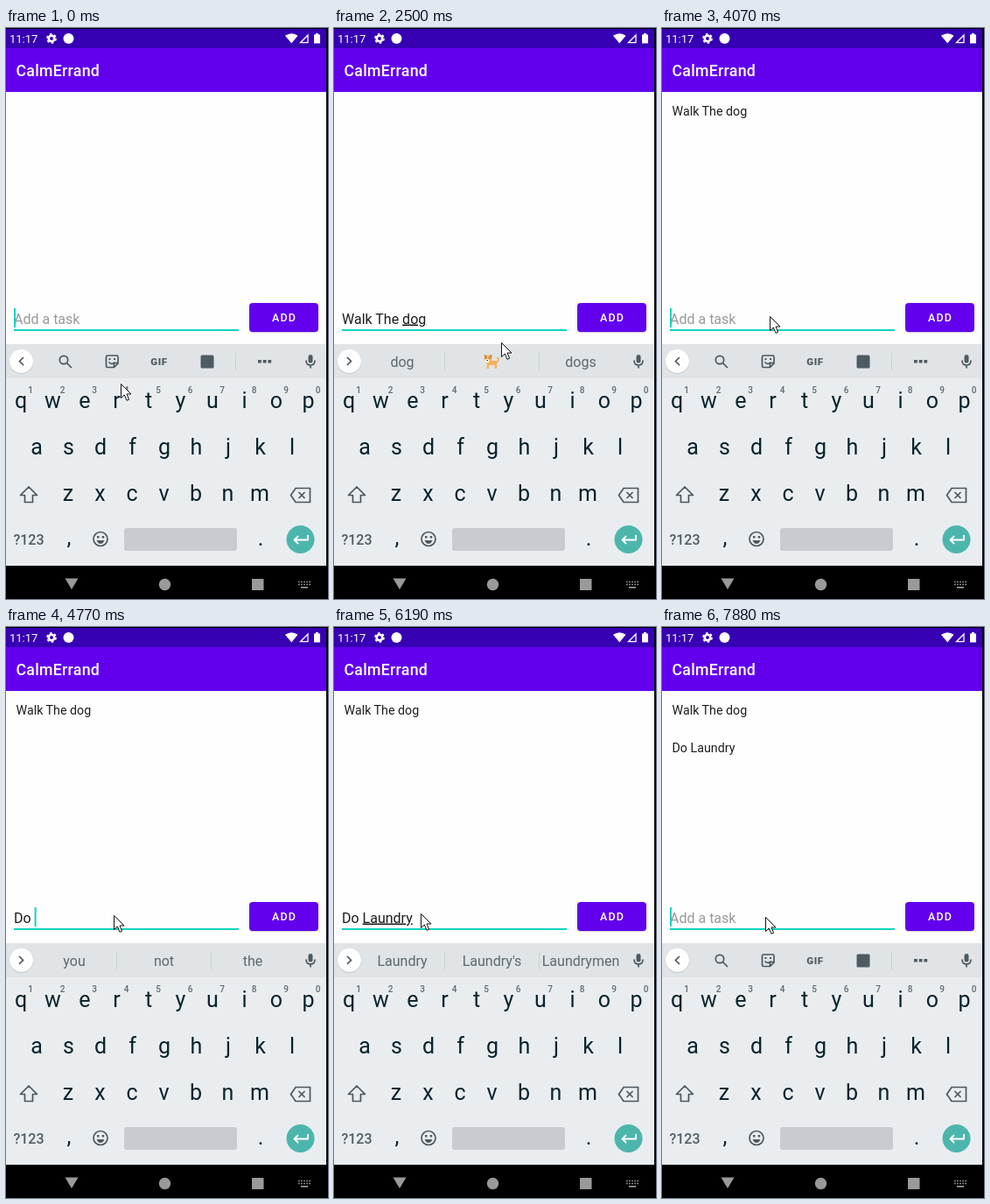
Recreate the animation shown at these times as an HTML page. Size 368 by 652 pixels, loop 8 s.

```html
<!DOCTYPE html>
<html lang="en">
<head>
<meta charset="utf-8">
<title>Task list</title>
<style>
html, body { margin: 0; width: 100%; height: 100%; overflow: hidden; background: #000; }
svg { display: block; }
text { font-family: Roboto, sans-serif; white-space: pre; }
.mid { text-anchor: middle; }
.key { font-size: 25px; fill: #08232d; }
.hint { font-size: 10px; font-weight: 500; fill: #5e6a70; }
.line { fill: none; stroke: #4b575e; stroke-width: 1.7; }
.icon { fill: #4f5b62; }
.nav { fill: #9a9a9a; }
.sug { font-size: 16px; fill: #5c686e; }
.sug.bold { font-weight: 700; fill: #000; }
.task { font-size: 14.25px; fill: #1d1d1d; }
</style>
</head>
<body>
<svg width="368" height="652" viewBox="0 0 368 652">
  <rect width="368" height="652"/>
  <rect y="1" width="366" height="22" fill="#3700b3"/>
  <rect y="23" width="366" height="50" fill="#6200ee"/>
  <rect y="73" width="366" height="288" fill="#fefefe"/>
  <rect y="361" width="366" height="40" fill="#e0e4e7"/>
  <rect y="400" width="366" height="214" fill="#e9edf0"/>

  <!-- status bar -->
  <g fill="#fff">
    <text x="4" y="17" font-size="13">11:17</text>
    <circle cx="52" cy="12" r="3.3" fill="none" stroke="#fff" stroke-width="2.6"/>
    <circle cx="52" cy="12" r="5.1" fill="none" stroke="#fff" stroke-width="1.6" stroke-dasharray="2.67"/>
    <circle cx="71.500" cy="12" r="6"/>
    <path d="M319 8.800Q326.500 3.800 333.500 8.800L326.300 17.500Z"/>
    <path d="M336.500 16.700H345V8Z" fill="none" stroke="#fff" stroke-width="1.300"/>
    <path d="M352 7.500h2v-1.500h3v1.500h2v10h-7z"/>
  </g>
  <text x="11.500" y="54.500" font-size="17.800" font-weight="500" letter-spacing=".25" fill="#fff">CalmErrand</text>

  <!-- tasks and entry field -->
  <text id="task0" class="task" x="11.500" y="100">Walk The dog</text>
  <text id="task1" class="task" x="11.500" y="143">Do Laundry</text>
  <text id="hint" x="9" y="337.500" font-size="16" fill="#999">Add a task</text>
  <text id="entry" x="9" y="337.500" font-size="16" fill="#1d1d1d"><tspan></tspan><tspan text-decoration="underline"></tspan></text>
  <rect x="9" y="344" width="257" height="2" fill="#10d3c2"/>
  <rect id="caret" y="320" width="2" height="22" fill="#10d3c2"/>
  <rect x="278" y="315" width="79" height="33" rx="4" fill="#000" opacity=".2"/>
  <rect x="278" y="314" width="79" height="33" rx="4" fill="#6200ee"/>
  <text class="mid" x="318" y="335" font-size="12.500" font-weight="500" letter-spacing="1.100" fill="#fff">ADD</text>

  <!-- keyboard strip -->
  <circle cx="17.500" cy="381.300" r="13.800" fill="#000" opacity=".12"/>
  <circle cx="17.500" cy="380.500" r="13.500" fill="#fff"/>
  <path id="chevron" class="line"/>
  <g id="tools">
    <circle class="line" cx="66" cy="379" r="4.700"/>
    <path class="line" d="M69.500 382.500L75 388" stroke-width="2"/>
    <path class="line" d="M116 374h10.500q1.500 0 1.500 1.500V383l-4.500 4.500H116q-1.500 0-1.500-1.500V375.500q0-1.500 1.500-1.500zM128 382.500h-4.500V387M117.500 381.500q3.500 4 7 0"/>
    <path class="icon" d="M117.500 377h2v2h-2zM123 377h2v2h-2z"/>
    <text class="mid icon" x="175" y="384.500" font-size="11.500" font-weight="900" letter-spacing=".6">GIF</text>
    <rect class="icon" x="222.500" y="373.500" width="15" height="15" rx="1.500"/>
    <path d="M262.500 371v20" stroke="#cbd0d3"/>
    <path class="icon" d="M288 379h3.800v3.500H288zM293.700 379h3.800v3.500h-3.800zM299.400 379h3.800v3.500h-3.800z"/>
  </g>
  <g id="words">
    <path d="M126.500 370v21M234.500 370v21" stroke="#cbd0d3"/>
    <text class="sug mid" x="78" y="387"></text>
    <text class="sug mid" x="180.500" y="387"></text>
    <text class="sug mid" x="282" y="387"></text>
    <g id="dog" fill="#f4b25e">
      <path d="M175 380h11v9h-2.500v-4H177v4h-2.500z"/>
      <circle cx="176" cy="378" r="4.500"/>
      <path d="M171.500 373l3 1-2 4zM180.500 373l-3 1 2.500 4z" fill="#c98236"/>
      <path d="M185 382q4.500-2 2-6" fill="none" stroke="#f4b25e" stroke-width="2.200"/>
      <ellipse cx="175" cy="380" rx="2.700" ry="2.200" fill="#fff3dc"/>
      <path d="M173.500 376.500h1v1h-1zM177 376.500h1v1h-1zM174.500 379h1.500v1h-1.500z" fill="#3e2a20"/>
    </g>
  </g>
  <rect class="icon" x="345.500" y="373" width="5" height="9.500" rx="2.500"/>
  <path class="line" d="M343 379.500q0 5.500 5 5.500t5-5.500M348 385v3.500" stroke-width="1.500"/>

  <!-- keys -->
  <g id="keys"></g>
  <path class="line" d="M26 524l-9.500 9.500H21.500V541.500h9V533.500h5z" stroke-linejoin="round"/>
  <path class="line" d="M325.500 533.500L331 525.500H347.500V541.500H331zM334.500 530l7 7M341.500 530l-7 7"/>
  <text class="mid icon" x="26" y="590" font-size="16" font-weight="500">?123</text>
  <text class="mid key" x="72" y="590">,</text>
  <text class="mid key" x="291" y="591">.</text>
  <circle class="line" cx="108" cy="583.500" r="8"/>
  <path class="icon" d="M104 580h2.500v2.500H104zM109.700 580h2.500v2.500h-2.500zM103.500 585h9q-1.500 4-4.500 4t-4.500-4z"/>
  <rect x="135" y="571" width="129" height="26" rx="3" fill="#c8ccd0"/>
  <circle cx="336.500" cy="584" r="16" fill="#4db6ac"/>
  <path d="M345 579v5.500H330M334 580l-4.500 4.500 4.500 4.500" fill="none" stroke="#fff" stroke-width="1.800"/>

  <!-- navigation bar -->
  <g class="nav">
    <path d="M67.500 628.500H82.500L75 641z"/>
    <circle cx="181.500" cy="635.500" r="6.700"/>
    <rect x="281" y="629" width="13.500" height="13"/>
    <path d="M334 632.500h14M334 635.500h14" stroke="#9a9a9a" stroke-width="1.700" stroke-dasharray="1.700 1.375"/>
    <path d="M337 638h8v1.700h-8z"/>
  </g>

  <path id="mouse" d="M.5.500V16.500L4.300 13L7 19.300L9.600 18.200L7 12H12Z" fill="#fff" stroke="#111"/>
</svg>
<script>
const $ = id => document.getElementById(id);

// Letter keys: text, first centre, baseline
let keys = "";
[["qwertyuiop", 17, 434], ["asdfghjkl", 35, 487], ["zxcvbnm", 71, 540]].forEach(([row, x0, y], r) =>
  [...row].forEach((c, i) => {
    const x = x0 + i * 36.5;
    keys += `<text class="key mid" x="${x}" y="${y}">${c}</text>`;
    if (!r) keys += `<text class="hint mid" x="${x + 11}" y="416.500">${(i + 1) % 10}</text>`;
  }));
$("keys").innerHTML = keys;

// Typing: time, field text, suggestions (* marks the automatic choice)
const typing = [
  [0, ""],
  [710, "W", "W|We|What"],
  [860, "Wal", "Wal|*Walk|Wall"],
  [1010, "Walk", "Walk|Walking|Walked"],
  [1150, "Walk ", "to|the|in"],
  [1430, "Walk th", "th|*thru|The"],
  [1580, "Walk The ", "first|same|only"],
  [1710, "Walk The d", "d|do|day"],
  [1840, "Walk The do", "do|don't|does"],
  [1970, "Walk The dog", "dog||dogs"],
  [3080, ""],
  [4480, "D", "D|Do|Don't"],
  [4620, "Do", "Do|Don't|Does"],
  [4760, "Do ", "you|not|the"],
  [4900, "Do L", "L|Let|Like"],
  [5050, "Do La", "La|Last|Later"],
  [5190, "Do Lau", "Lau|Laugh|Launch"],
  [5330, "Do Laun", "Laun|*Laundry|Launch"],
  [5460, "Do Laundr", "Laundr|*Laundry|Laundrymen"],
  [5610, "Do Laundry", "Laundry|Laundry's|Laundrymen"],
  [6750, ""]
];

// Pointer: time, x, y
const pointer = [
  [0, 131, 406], [2500, 191, 359], [2650, 262, 340], [2790, 302, 331], [2940, 305, 330],
  [3230, 270, 331], [3370, 185, 332], [3520, 126, 331], [3650, 124, 330], [3790, 123, 329],
  [6190, 99, 327], [6310, 190, 329], [6450, 290, 330], [6600, 305, 330], [6900, 155, 330],
  [7610, 145, 330], [7750, 128, 331], [7880, 118, 331]
];

// Caret: time, visible
const blink = [
  [0, 1], [280, 0], [710, 1], [2500, 0], [3080, 1], [3520, 0],
  [4070, 1], [6190, 0], [6750, 1], [7170, 0], [7610, 1]
];

const at = (list, t) => list.findLast(step => step[0] <= t);
const show = (id, on) => $(id).style.display = on ? "" : "none";

function draw(t) {
  const [, text, words] = at(typing, t);
  const [, x, y] = at(pointer, t);
  const split = text.lastIndexOf(" ") + 1;
  const [done, composing] = $("entry").children;
  done.textContent = text.slice(0, split);
  composing.textContent = text.slice(split);

  show("hint", !text);
  show("tools", !text);
  show("words", text);
  show("task0", t >= 3080);
  show("task1", t >= 6750);
  show("caret", at(blink, t)[1]);
  $("caret").setAttribute("x", 9 + (text ? $("entry").getComputedTextLength() : 0));
  $("chevron").setAttribute("d", text ? "M15 376l4.500 4.500-4.500 4.500" : "M20 376l-4.500 4.500 4.500 4.500");

  if (text) {
    const list = words.split("|");
    document.querySelectorAll(".sug").forEach((el, i) => {
      el.textContent = list[i].replace("*", "");
      el.classList.toggle("bold", list[i][0] === "*");
    });
    show("dog", !list[1]);
  }
  $("mouse").setAttribute("transform", `translate(${x} ${y})`);
}

const start = performance.now();
function loop() {
  draw((performance.now() - start) % 8000);
  requestAnimationFrame(loop);
}
loop();
</script>
</body>
</html>
```
